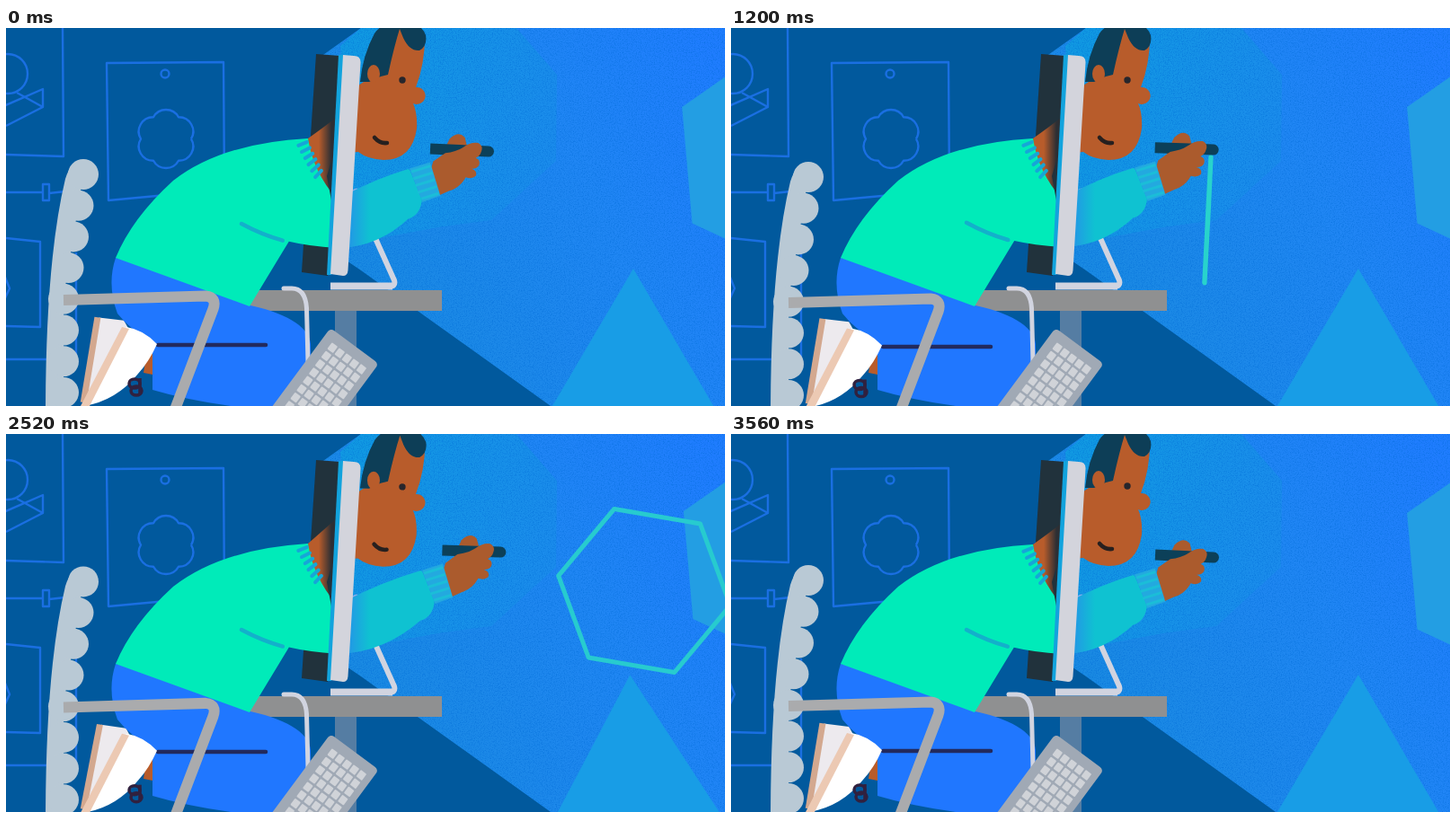
Write an HTML page that moves like this. It is 800 px wide and 421 px high and loops after 3600 ms.

```html
<!DOCTYPE html>
<html lang="en">
<head>
<meta charset="utf-8">
<title>Reaching through the screen</title>
<style>
  html, body { margin: 0; width: 100%; height: 100%; overflow: hidden; background: #01599d; }
  svg { position: absolute; left: 0; top: 0; width: 800px; height: 421px; }
</style>
</head>
<body>
<svg viewBox="0 0 800 421">
  <defs>
    <linearGradient id="beam" gradientUnits="userSpaceOnUse" x1="390" y1="260" x2="800" y2="60">
      <stop offset="0" stop-color="#1a8ae2"/><stop offset=".6" stop-color="#2086f4"/><stop offset="1" stop-color="#207dff"/>
    </linearGradient>
    <linearGradient id="facet" gradientUnits="userSpaceOnUse" x1="390" y1="60" x2="613" y2="110">
      <stop offset="0" stop-color="#1199e2"/><stop offset="1" stop-color="#1b8cec"/>
    </linearGradient>
    <filter id="grain" x="0" y="0" width="1" height="1" color-interpolation-filters="sRGB">
      <feTurbulence type="fractalNoise" baseFrequency=".8" numOctaves="2" seed="4"/>
      <feColorMatrix values="0 0 0 0 0  0 0 0 0 .42  0 0 0 0 .84  1.4 0 0 0 -.62"/>
      <feComposite operator="in" in2="SourceGraphic" result="dots"/>
      <feMerge><feMergeNode in="SourceGraphic"/><feMergeNode in="dots"/></feMerge>
    </filter>
  </defs>
  <rect width="800" height="421" fill="#01599d"/>
  <g fill="none" stroke="#1a6fe2" stroke-width="2.4" stroke-linejoin="round">
    <path d="M63 0L64 143L0 141M45-2V0M-5 88L41 68V88L12 72M41 88L0 109"/>
    <circle cx="2" cy="51" r="22"/>
    <path d="M112 39L242 38L243 180L114 192Z"/>
    <circle cx="177" cy="51" r="4.5"/>
    <path id="flower"/>
    <path d="M0 183H40M48 184L66 182M41 174H48V192H41ZM0 234L38 238V333L0 332M-2 275L4 290L-2 303M0 369H78V250"/>
  </g>
  <g filter="url(#grain)">
    <path d="M395 0L350 32L370 253L395 270L606 421H800V0Z" fill="url(#beam)"/>
    <path d="M395 0H568L613 52L612 148L540 214L480 222L384 240L372 20Z" fill="url(#facet)"/>
  </g>
</svg>

<svg viewBox="0 0 800 421">
  <defs>
    <linearGradient id="neckFill" gradientUnits="userSpaceOnUse" x1="348" y1="0" x2="362" y2="0">
      <stop offset="0" stop-color="#b85c2b"/><stop offset="1" stop-color="#2c2f34"/>
    </linearGradient>
    <linearGradient id="sleeveFill" gradientUnits="userSpaceOnUse" x1="383" y1="0" x2="405" y2="0">
      <stop offset="0" stop-color="#219be4"/><stop offset="1" stop-color="#0fc2d1"/>
    </linearGradient>
    <clipPath id="beyond"><path d="M374 -20H800V421H366L380 30Z"/></clipPath>
  </defs>

  <path id="tri" d="M698 268L585 460H810Z" fill="#189de6"/>
  <polygon id="old" fill="#239ee3"/>
  <polygon id="fill"/>
  <polygon id="outline" fill="none" stroke-width="5" stroke-linejoin="round"/>

  <path d="M345 29L372 31L358 276L329 272Z" fill="#21323c"/>
  <rect x="366" y="314" width="24" height="107" fill="#557da3"/>
  <path d="M264 292H485V315H264Z" fill="#8f9091"/>
  <g fill="none" stroke="#d1d4e0" stroke-width="6">
    <path d="M388 183L432 281Q434 288 426 288H361" stroke-linejoin="round"/>
    <path d="M361 287.500H430" stroke-width="8"/>
  </g>
  <circle cx="390" cy="184" r="5.500" fill="#86aeea"/>

  <g id="chair" fill="#b9c9d5">
    <path d="M86 147Q72 148 66 168Q44 260 44 430H64V300L86 163Z"/>
  </g>

  <g id="foot">
    <path d="M92 321H120L134 340L135 385L88 415Z" fill="#edeaee"/>
    <path d="M87 321H94L90 417H83Z" fill="#d3a88f"/>
  </g>
  <path d="M157 358L166 360L163 386L153 384Z" fill="#b85c2b"/>
  <path d="M122 256Q112 286 124 318Q138 336 163 350V403Q200 414 250 421H330L339 372V352C338 336 318 319 272 309L200 270Z" fill="#2077ff"/>
  <path id="seam" d="M169 353H289" stroke="#222a5e" stroke-width="4.500" stroke-linecap="round"/>
  <g id="shoe">
    <path d="M133 333Q152 336 167 352Q158 372 146 385Q122 415 86 421Z" fill="#fff"/>
    <path d="M128 333L136 335L92 421H82Z" fill="#ecc9b3"/>
    <g fill="none" stroke="#30213f" stroke-width="3.500">
      <ellipse cx="142" cy="396" rx="6" ry="5"/><ellipse cx="144" cy="404" rx="6" ry="5"/><path d="M148 390V408"/>
    </g>
  </g>

  <path id="neck" fill="url(#neckFill)"/>
  <path id="sweater" fill="#00ebb9"/>
  <path id="wedge" fill="#21323c"/>
  <path id="fold" fill="none" stroke="#13b0cb" stroke-width="4.500" stroke-linecap="round"/>
  <g id="ribs" stroke="#16a6d8" stroke-width="4" stroke-linecap="round"/>

  <g clip-path="url(#beyond)">
    <g id="head">
      <path d="M430 -5L466 10Q466 40 456 66A9.500 9.500 0 1 1 453 84Q458 95 457 112Q452 147 420 147Q402 146 392 138L368 140V80L398 60L424 50Z" fill="#b85c2b"/>
      <path d="M394 60Q397 30 410 6Q420 -8 442 -8Q462 -6 467 8Q469 20 460 25Q449 26 442 11L438 1Q432 20 425 52L417 54L404 60Z" fill="#0d3e57"/>
      <ellipse cx="409" cy="51" rx="7" ry="10" fill="#b85c2b"/>
      <circle cx="441" cy="58" r="3.700" fill="#27262c"/>
      <path d="M410 122Q416 129 424 128" fill="none" stroke="#27201f" stroke-width="4.500" stroke-linecap="round"/>
    </g>
  </g>

  <g id="hand" fill="#ab5b2d">
    <path d="M-20 6L-12 -12Q-2 -22 5 -14L8 -4L-8 8Z"/>
    <path d="M-33 -6H32A6 6 0 0 1 32 6H-33Z" fill="#0c4059"/>
    <path d="M-29 14L-16 4Q-4 2 3 -3Q12 -10 20 -9Q26 -6 24 0Q23 5 18 8Q24 10 22 16Q20 20 14 20Q21 22 19 28Q15 32 8 30Q2 42 -10 46L-26 54L-34 34Z"/>
  </g>
  <path id="sleeve" fill="url(#sleeveFill)" stroke="url(#sleeveFill)" stroke-width="6" stroke-linejoin="round"/>
  <g id="cuff">
    <path d="M-24 -19L0 -19V20L-21 21Z" fill="#23a9df"/>
    <path d="M-23 -15H-1M-23 -7H-1M-23 1H-1M-23 9H-1M-21 17H-1" stroke="#1bbdd8" stroke-width="3"/>
  </g>

  <path d="M370 30H376L362 275H357Z" fill="#12a3dd"/>
  <path d="M375 30L387 31Q395 31 394.500 39L380.500 270Q380 276 375 276L361 274Z" fill="#d3d4dc"/>

  <path id="rest" d="M64 303L222 298.500Q235 300 230.500 313L186 430" fill="none" stroke="#aaabad" stroke-width="12"/>
  <path d="M309 290H318Q333 290 334.500 312L336 372" fill="none" stroke="#d1d4e0" stroke-width="5" stroke-linecap="round"/>
  <g id="keys" transform="translate(361 334) rotate(36.500)" fill="#d0d3d8">
    <rect width="67" height="150" rx="5" fill="#a0a9b5"/>
  </g>
</svg>

<script>
const LOOP = 3600, STEP = 40;
const $ = id => document.getElementById(id);
const set = (id, name, value) => $(id).setAttribute(name, value);
const rad = deg => deg * Math.PI / 180;
const mix = (a, b, u) => a + (b - a) * u;

// Progress from time a to time b: even, or eased at both ends.
const ramp = (t, a, b) => Math.min(1, Math.max(0, (t - a) / (b - a)));
const ease = (t, a, b) => { const u = ramp(t, a, b); return u * u * (3 - 2 * u); };
// Rises from a to b, holds, falls from c to d.
const pulse = (t, a, b, c, d) => ease(t, a, b) * (1 - ease(t, c, d));

// Maps a local point through a turn and a shift.
const place = (x, y, deg, ox, oy) => {
  const c = Math.cos(rad(deg)), s = Math.sin(rad(deg));
  return [ox + x * c - y * s, oy + x * s + y * c];
};
const hexagon = (cx, cy, r, turn) =>
  Array.from({ length: 6 }, (_, i) => place(r, 0, turn + 60 * i, cx, cy));
const points = list => list.map(p => p.map(v => v.toFixed(2)).join()).join(' ');

// The drawn figure when it is half open.
const HALF_OPEN = [[564, 234], [527, 289], [494, 243], [500, 165], [515, 124], [545, 125]];
const morph = (from, to, u) => from.map((p, i) => p.map((v, k) => mix(v, to[i][k], u)));

function drawShapes(t) {
  set('tri', 'transform', `rotate(${-5.5 * pulse(t, 2400, 2640, 2760, 3320)} 700 345)`);

  const shrink = ease(t, 2440, 2920);
  set('old', 'points', points(hexagon(
    mix(870, 775, shrink), mix(143, 61, shrink), 130 * (1 - shrink), 25)));

  const fly = 1 - (1 - ramp(t, 2280, 3160)) ** 2, swell = ease(t, 2560, 3160);
  const wide = 10 * pulse(t, 1700, 1900, 1900, 2160);
  const cx = mix(568, 870, fly) + wide, cy = mix(202.5, 143, fly);
  const r = mix(97, 130, swell), turn = mix(7.3, 25, mix(fly, swell, .7));
  const tint = ease(t, 2280, 3280);
  const color = `rgb(${mix(40, 35, tint)},${mix(211, 158, tint)},${mix(204, 227, tint)})`;
  set('fill', 'points', points(hexagon(cx, cy, r * ease(t, 2620, 3080), turn)));
  set('fill', 'fill', color);

  const tip = mix(144, 284, ramp(t, 240, 600));
  const line = [.4, 1, 1, .4, 0, 0].map(u => {
    const y = Math.min(mix(144, 284, u), tip);
    return [534 - (y - 144) / 20, y];
  });
  const split = ramp(t, 1160, 1600) ** 2, open = 1 - (1 - ramp(t, 1600, 1920)) ** 1.3;
  const shape = morph(morph(line, HALF_OPEN, split), hexagon(cx, cy, r, turn), open);
  set('outline', 'points', points(shape));
  set('outline', 'stroke', color);
  set('outline', 'opacity', t < 240 ? 0 : 1 - ease(t, 2840, 3120));
}

function drawMan(t) {
  const draw = pulse(t, 40, 680, 720, 1160);
  const stoop = pulse(t, 0, 320, 720, 1160);
  const lift = pulse(t, 1100, 1500, 2200, 2440);
  const grip = pulse(t, 1640, 2100, 2200, 2440);
  const flick = pulse(t, 2200, 2440, 2440, 2640);
  const recoil = pulse(t, 2440, 2760, 2840, 3320);
  const hop = pulse(t, 0, 320, 320, 640);
  const bob = 2 - 2 * Math.cos(2 * Math.PI * t / 900);

  const px = 505 + 40 * draw * (1 - draw) - 2 * lift - 9 * grip + 25 * flick - 18 * recoil;
  const py = 136 + 114 * draw - 10 * lift + 2 * grip - 4 * flick - 18 * recoil;
  const pen = 2.7 + 50 * draw - 5 * lift - 14 * grip - 6 * recoil;
  const low = 245 + 31 * draw - 7 * lift + 4 * grip - recoil;

  set('head', 'transform', `translate(${11 * stoop + 5 * flick - 21 * recoil} `
    + `${15 * stoop + 4 * flick - 11 * recoil}) rotate(${8 * stoop + 2 * flick - 6 * recoil} 441 58)`);
  set('hand', 'transform', `translate(${px} ${py}) rotate(${pen})`);
  set('foot', 'transform', `translate(0 ${bob * .5}) rotate(${7 - 7 * hop + 10 * recoil} 86 415)`);
  set('shoe', 'transform', `translate(1 ${bob * .5})`);
  set('seam', 'transform', `translate(0 ${bob * .7})`);
  set('rest', 'transform', `translate(${draw} ${bob})`);
  set('chair', 'transform', `translate(0 ${bob}) rotate(${draw * .5} 60 421)`);

  const bend = -17 + Math.max(0, pen - 2.7) * .53;
  const [wx, wy] = place(-26, 33, pen, px, py);
  const top = place(-27, -16, bend, wx, wy), bottom = place(-24, 18, bend, wx, wy);
  set('cuff', 'transform', `translate(${wx} ${wy}) rotate(${bend})`);
  set('sleeve', 'd', `M376 ${low - 55}Q${mix(380, top[0], .5)} ${mix(low - 60, top[1], .6)} ${top}`
    + `L${bottom}Q${bottom[0] - 2} ${bottom[1] + 15} ${bottom[0] - 14} ${bottom[1] + 18}`
    + `Q${mix(376, bottom[0], .45)} ${low - 5} 372 ${low - 3}Z`);

  const nx = 336 + 4 * stoop, ny = 123 - 4 * stoop - 6 * recoil;
  const nape = 98 + 12 * stoop - 32 * recoil;
  const ax = 318 - (low - 237) * .4, ay = 233 + (low - 237) * .58;
  set('neck', 'd', `M${nx} ${ny}Q360 ${nape + 8} 369 ${nape}V190L340 160Z`);
  set('sweater', 'd', `M122 256Q140 212 186 170Q240 128 ${nx} ${ny}`
    + `Q${nx + 6} ${ny + 38} 368 190V${low}Q${mix(ax, 358, .5)} ${mix(ay, low, .7)} ${ax} ${ay}L271 310Z`);
  set('wedge', 'd', `M${mix(357, 338, draw)} ${mix(165, 196, draw)}L362 ${mix(148, 158, draw)}V${mix(192, 211, draw)}Z`);
  set('ribs', 'transform', `translate(${nx - 336} ${ny - 123})`);

  const fx = 262 - 10 * draw, fy = 218 - 25 * draw * draw - 8 * lift + 4 * grip;
  const gx = ax - 7 - 16 * draw, gy = ay - 1 - 21 * draw;
  set('fold', 'd', `M${fx} ${fy}Q${mix(fx, gx, .5)} ${mix(fy, gy, .5) + 3} ${gx} ${gy}`);
}

function add(parent, tag, attrs) {
  const el = document.createElementNS('http://www.w3.org/2000/svg', tag);
  for (const name in attrs) el.setAttribute(name, attrs[name]);
  $(parent).append(el);
}

function build() {
  const notch = i => place(28, 0, 60 * i, 178, 123.5);
  let petals = `M${notch(0)}`;
  for (let i = 1; i <= 6; i++) petals += `A16 16 0 0 1 ${notch(i)}`;
  set('flower', 'd', petals);

  for (let i = 0; i < 8; i++)
    add('chair', 'circle', { cx: 64 + 5.5 * Math.max(0, 4 - i), cy: 163 + 34.7 * i, r: 17 });
  for (let i = 0; i < 6; i++)
    add('ribs', 'path', { d: 'M-5 0H5', transform: `translate(${330 + 3.5 * i} ${129 + 6.7 * i}) rotate(${-22 - 5 * i})` });
  for (let row = 0; row < 11; row++)
    for (let col = 0; col < 5; col++)
      add('keys', 'rect', { x: 11 + col * 10, y: 12 + row * 11.5, width: 8, height: 9, rx: 1 });
}

build();
const start = performance.now();
function frame(now) {
  const t = Math.floor((Math.max(0, now - start) % LOOP) / STEP) * STEP;
  drawShapes(t);
  drawMan(t);
  requestAnimationFrame(frame);
}
frame(start);
</script>
</body>
</html>
```
